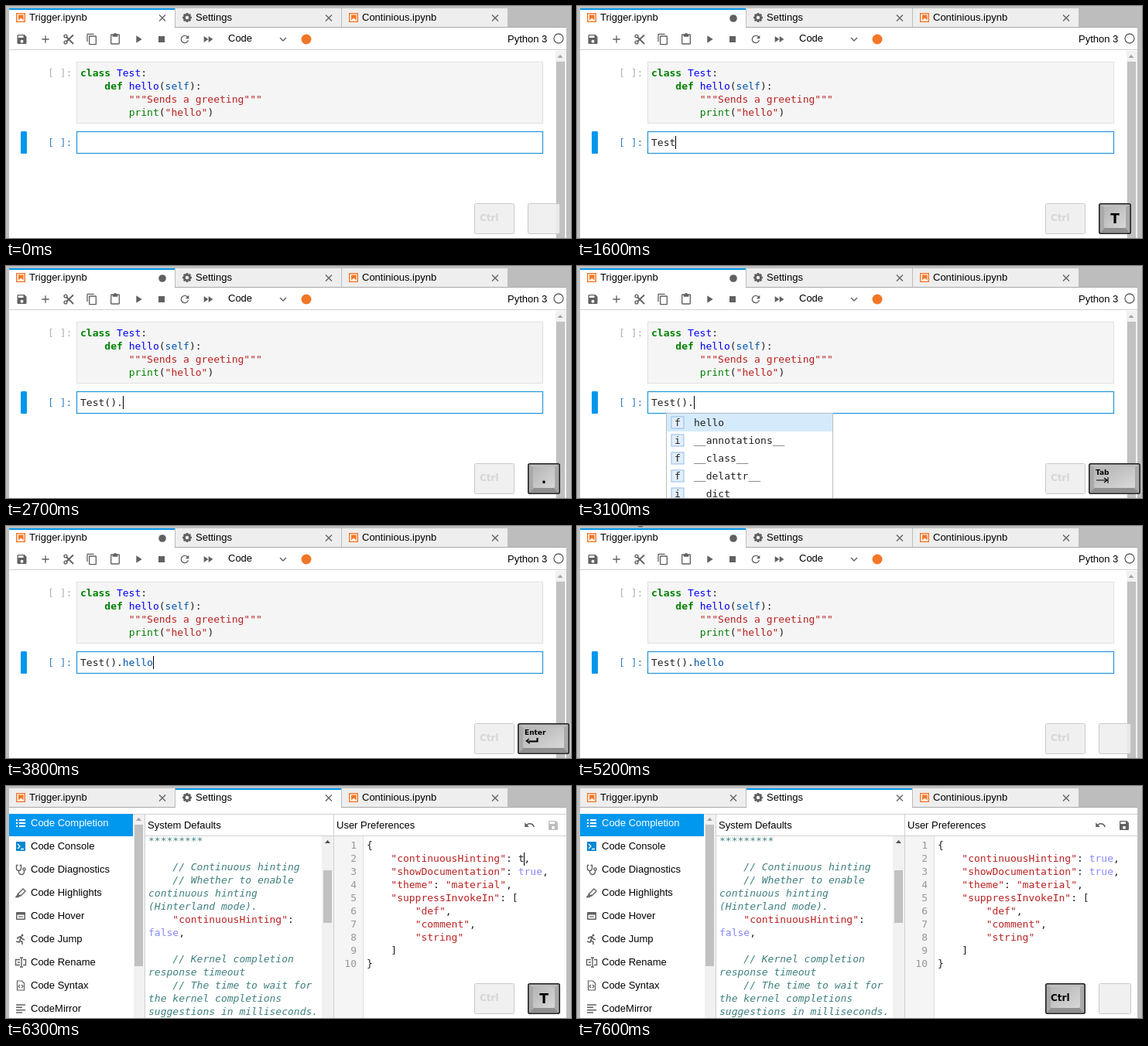
These frames come from a looping animation (730 px wide and 300 px high, 8000 ms). An HTML page:

```html
<!DOCTYPE html>
<html lang="en">
<head>
<meta charset="utf-8">
<title>Notebook completion</title>
<style>
html, body { margin: 0; width: 100%; height: 100%; overflow: hidden; background: #bdbdbd; }
svg { display: block; width: 730px; height: 300px; }
text { white-space: pre; fill: #000; }
.ui { font: 13px "Liberation Sans", Arial, sans-serif; }
.mono { font: 13px "DejaVu Sans Mono", monospace; fill: #212121; }
.kw { fill: #008000; font-weight: bold; }
.def { fill: #0000ff; }
.var { fill: #0055aa; }
.str { fill: #ba2121; }
.fn { fill: #008000; }
.com { fill: #408080; font-style: italic; }
.atom { fill: #8888ff; }
.num { fill: #999; text-anchor: end; }
.key { font: bold 17px "DejaVu Sans", sans-serif; }
.line { fill: none; stroke: #616161; stroke-width: 1.4; }
</style>
</head>
<body>
<svg id="stage" viewBox="0 0 730 300" xmlns="http://www.w3.org/2000/svg"></svg>
<script>
const LOOP = 8000;
const CHAR = 7.826;
const BLUE = '#0097ee', ORANGE = '#f37726', INK = '#616161', FADED = '#bdbdbd';

// Markup helpers
const rect = (x, y, w, h, fill, more = '') => `<rect x="${x}" y="${y}" width="${w}" height="${h}" fill="${fill}" ${more}/>`;
const path = (d, fill, more = '') => `<path d="${d}" fill="${fill}" ${more}/>`;
const stroke = (d, color = INK, width = 1.4) => `<path d="${d}" fill="none" stroke="${color}" stroke-width="${width}"/>`;
const ring = (x, y, r, color = INK, width = 1.4) => `<circle cx="${x}" cy="${y}" r="${r}" fill="none" stroke="${color}" stroke-width="${width}"/>`;
const dot = (x, y, r, fill, more = '') => `<circle cx="${x}" cy="${y}" r="${r}" fill="${fill}" ${more}/>`;
const at = (x, y, body, more = '') => `<g transform="translate(${x} ${y})" ${more}>${body}</g>`;
const group = (id, body) => `<g id="${id}">${body}</g>`;
const ui = (x, y, s, more = '') => `<text class="ui" x="${x}" y="${y}" ${more}>${s}</text>`;
const spans = parts => parts.map(p => typeof p === 'string' ? p : `<tspan class="${p[0]}">${p[1]}</tspan>`).join('');
const code = (x, y, ...parts) => `<text class="mono" x="${x}" y="${y}">${spans(parts)}</text>`;
const glyph = (cx, cy, d, more = '') =>
  `<path transform="translate(${cx - 8} ${cy - 8}) scale(.6667)" d="${d}" fill="${INK}" ${more}/>`;

const SAVE = 'M17 3H5c-1.1 0-2 .9-2 2v14c0 1.1.9 2 2 2h14c1.1 0 2-.9 2-2V7zM12 19a3 3 0 1 1 0-6a3 3 0 0 1 0 6zM15 9H5V5h10z';

// Tabs
const noteIcon = x => rect(x + .7, 9.7, 10.6, 10.6, '#fff', `stroke="${ORANGE}" stroke-width="1.4"`) +
  path(`M${x + 3} 11.5h6.5v7l-3.2 -3l-3.3 3z`, ORANGE);
const gear = (x, y) => ring(x, y, 3.6, INK, 2.8) + [0, 45, 90, 135].map(a =>
  `<path d="M-6 0h2.2M3.8 0h2.2" transform="translate(${x} ${y}) rotate(${a})" stroke="${INK}" stroke-width="2.6"/>`).join('');
const cross = x => stroke(`M${x - 4} 11.5l8 8m0 -8l-8 8`, INK, 1.3);

function tabs(active) {
  const names = ['Trigger.ipynb', 'Settings', 'Continious.ipynb'];
  return rect(4, 27, 720, 1, '#a9a9a9') + names.map((name, i) => {
    const x = 4 + 215 * i, on = i === active;
    return rect(x, 3, 214, on ? 26 : 24, on ? '#fff' : '#eee') +
      (on ? rect(x, 3, 214, 2, BLUE) : '') +
      (i === 1 ? gear(234, 15) : noteIcon(x + 9)) +
      ui(x + 26, 19, name);
  }).join('') + cross(417) + cross(632);
}

// Notebook page
function scissors(x, y) {
  return ring(x - 4, y - 4, 1.9) + ring(x - 4, y + 4, 1.9) +
    stroke(`M${x - 3} ${y - 3}L${x + 6} ${y + 6}M${x - 3} ${y + 3}L${x + 6} ${y - 5.5}`, INK, 1.8);
}

function toolbar() {
  return glyph(20.5, 43, SAVE) +
    glyph(51, 43, 'M19 13h-6v6h-2v-6H5v-2h6V5h2v6h6z') +
    scissors(81, 43) +
    glyph(111, 43, 'M16 1H4c-1.1 0-2 .9-2 2v14h2V3h12zM19 5H8c-1.1 0-2 .9-2 2v14c0 1.1.9 2 2 2h11c1.1 0 2-.9 2-2V7c0-1.1-.9-2-2-2zM19 21H8V7h11z', 'fill-rule="evenodd"') +
    glyph(141, 43, 'M19 2h-4.2a3 3 0 0 0-5.6 0H5c-1.1 0-2 .9-2 2v16c0 1.1.9 2 2 2h14c1.1 0 2-.9 2-2V4c0-1.1-.9-2-2-2zM19 20H5V4h2v3h10V4h2z', 'fill-rule="evenodd"') +
    glyph(171, 43, 'M8 5v14l11-7z') +
    glyph(201, 43, 'M6 6h12v12H6z') +
    glyph(231, 43, 'M17.65 6.35A8 8 0 1 0 19.73 14h-2.08A6 6 0 1 1 16.22 7.78L13 11h7V4z') +
    glyph(261, 43, 'M4 18l8.5-6L4 6zM13 6v12l8.5-6z') +
    ui(287, 46, 'Code') + stroke('M354 41l4 4l4 -4') +
    dot(388, 43, 6.5, ORANGE) +
    ui(648, 47, 'Python 3') + ring(714, 42, 6, INK, 1.3);
}

function completer() {
  const items = ['hello', '__annotations__', '__class__', '__delattr__', '__dict__'];
  const rows = items.map((name, i) => {
    const y = 191 + 23 * i;
    return (i ? '' : rect(116, y, 214, 23, '#d5ebfb')) +
      rect(122, y + 4, 16, 15, '#e3eefb', 'stroke="#90bdea"') +
      `<text class="mono" x="126" y="${y + 16}">${i === 1 || i === 4 ? 'i' : 'f'}</text>` + code(151, y + 16, name);
  }).join('');
  return rect(115.5, 190.5, 215, 120, '#fff', 'stroke="#bdbdbd"') + rows +
    group('docs', rect(330.5, 190.5, 160, 120, '#fff', 'stroke="#bdbdbd"') + ui(340, 208, 'Sends a greeting'));
}

function notebook() {
  return tabs(0) + group('clean', cross(202)) + group('dirty', dot(202, 16, 4.8, INK)) +
    rect(4, 28, 720, 28, '#fff') + rect(4, 56, 720, 244, '#fff') + rect(4, 56, 720, 1, '#d0d0d0') + toolbar() +
    rect(710, 58, 14, 242, '#f1f1f1') + path('M712.5 67l3.5 -4l3.5 4z', '#a3a3a3') + rect(711, 72, 11, 228, '#c1c1c1') +
    '<text class="mono" x="54" y="91" style="fill:#b0b0b0">[ ]:</text>' +
    rect(91.5, 72.5, 602, 79, '#f5f5f5', 'stroke="#e0e0e0"') +
    code(96, 91, ['kw', 'class'], ' ', ['def', 'Test'], ':') +
    code(96, 108, '    ', ['kw', 'def'], ' ', ['def', 'hello'], '(', ['var', 'self'], '):') +
    code(96, 125, '        ', ['str', '"""Sends a greeting"""']) +
    code(96, 142, '        ', ['fn', 'print'], '(', ['str', '"hello"'], ')') +
    rect(19, 162, 8, 29, BLUE, 'rx="1.5"') +
    '<text class="mono" x="54" y="181" style="fill:#307fc1">[ ]:</text>' +
    rect(91.5, 162.5, 602, 28, '#fff', 'stroke="#1f97da" stroke-width="1.2"') +
    '<text class="mono" id="cell" x="96" y="181"></text>' + rect(96, 168, 1, 17, '#000', 'id="caret"') +
    group('popup', completer()) + group('pointer', path('M78 0h8l-2 1.6h-4z', '#666'));
}

// Settings page; every side icon is drawn around its own centre
const sideIcons = [
  stroke('M-6 -4h2M-2 -4h8M-6 0h2M-2 0h8M-6 4h2M-2 4h8', '#fff', 1.8),
  rect(-6, -6, 12, 12, '#0288d1') + stroke('M-4 -3l3 3l-3 3M0 3.5h4', '#fff', 1.3),
  stroke('M-3.5 -5.5h-2v4a3 3 0 0 0 6 0v-4h-2M-2.5 2v1a3.5 3.5 0 0 0 7 0v-2') + ring(4.5, -.5, 1.6),
  stroke('M-3 1l6 -6l3 3l-6 6h-3zM-3 1l-1 1l2 2l2 -1M-4 3l-2 2.5h3l1 -1'),
  rect(-6, -5, 12, 10, INK, 'rx="1"') + rect(-4.5, -1.5, 9, 5, '#fff') + stroke('M-3 1h6', INK, 1.2),
  dot(2, -5, 1.5, INK) + stroke('M-4 0v-2l4 -1.2l2 3l3 1M0 -3l-1 5l3 1.5v3.5M-1 1l-1 3l-4 -1', INK, 1.6),
  stroke('M-1 -3.5h-5.5v7h5.5M3 -3.5h3.5v7h-3.5M1 -6v12M-1 -6h4M-1 6h4M-4 0h3'),
  stroke('M-4.5 -6h6l3 3v9h-9zM-1 -1l-2 2l2 2M1 -1l2 2l-2 2', INK, 1.2),
  stroke('M-6 -5h12M-6 -1.7h8M-6 1.7h12M-6 5h8', INK, 1.5)
];

function sidebar() {
  const names = ['Completion', 'Console', 'Diagnostics', 'Highlights', 'Hover', 'Jump', 'Rename', 'Syntax'].map(s => 'Code ' + s);
  return rect(4, 36, 160, 29, BLUE) + [...names, 'CodeMirror'].map((name, i) =>
    at(19, 48 + 30 * i, sideIcons[i]) + ui(32, 52 + 30 * i, name, i ? '' : 'style="fill:#fff"')).join('') +
    rect(165, 37, 14, 263, '#f1f1f1') + path('M168 45l3.5 -4l3.5 4z', '#a3a3a3') + rect(166, 50, 11, 183, '#c1c1c1');
}

function defaults() {
  const com = s => [['com', s]];
  const lines = [com('*********'), [], com('    // Continuous hinting'), com('    // Whether to enable'),
    com('continuous hinting'), com('(Hinterland mode).'), ['    ', ['str', '"continuousHinting"'], ':'],
    [['atom', 'false'], ','], [], com('    // Kernel completion'), com('response timeout'),
    com('    // The time to wait for'), com('the kernel completions'), com('suggestions in milliseconds.')];
  return ui(183, 55, 'System Defaults') + lines.map((l, i) => code(184, 75 + 17 * i, ...l)).join('') +
    rect(408, 65, 15, 235, '#f1f1f1') + path('M412 74l3.5 -4l3.5 4z', '#505050') + rect(410, 109, 11, 68, '#c1c1c1');
}

function preferences() {
  const pair = (key, ...rest) => ['    ', ['str', `"${key}"`], ': ', ...rest];
  const item = (s, end = ',') => ['        ', ['str', `"${s}"`], end];
  const lines = [['{'], [], pair('showDocumentation', ['atom', 'true'], ','),
    pair('theme', ['str', '"material"'], ','), pair('suppressInvokeIn', '['),
    item('def'), item('comment'), item('string', ''), ['    ]'], ['}']];
  return rect(423, 36, 1, 264, '#d0d0d0') + ui(427, 55, 'User Preferences') +
    `<path id="undo" transform="translate(669 43) scale(.62)" d="M12.5 8c-2.65 0-5.05 1-6.9 2.6L2 7v9h9l-3.6-3.6a8 8 0 0 1 12.7 4l2.4-.8A10.5 10.5 0 0 0 12.500 8z"/>` +
    glyph(707, 51, SAVE, 'id="save"') +
    rect(424, 65, 37, 235, '#f5f5f5') + rect(461, 65, 1, 235, '#ddd') +
    rect(661.6, 86, 5 * CHAR, 17, '#d7d4f0', 'id="selection"') +
    lines.map((l, i) => `<text class="mono num" x="453" y="${81 + 17 * i}" style="fill:#999">${i + 1}</text>` + code(466, 81 + 17 * i, ...l)).join('') +
    '<text class="mono" id="hint" x="466" y="98"></text>' + rect(670, 86, 1, 17, '#000', 'id="caret2"');
}

function settings() {
  return tabs(1) + cross(202) + rect(4, 28, 720, 272, '#fff') + rect(4, 36, 720, 1, '#d0d0d0') +
    sidebar() + rect(179, 36, 1, 264, '#d0d0d0') + defaults() + preferences() +
    rect(180, 64, 544, 1, '#d0d0d0');
}

// On-screen keys
const keyOff = (x, w) => rect(x + .5, 255.5, w - 1, 39, '#eee', 'rx="2" stroke="#c9c9c9" fill-opacity=".88"');
const keyOn = (x, w) => rect(x + .8, 255.8, w - 1.6, 38.4, '#a9a9a9', 'rx="2" stroke="#222" stroke-width="1.6"') +
  path(`M${x + 2} 257h${w - 4}l-6 4h${16 - w}z`, '#bebebe') +
  path(`M${x + 2} 293h${w - 4}l-6 -6h${16 - w}z`, '#8f8f8f') +
  rect(x + 7, 260, w - 14, 27, 'url(#face)', 'rx="2"');
const label = (x, y, s, size, fill, more = '') =>
  `<text class="key" x="${x}" y="${y}" style="font-size:${size}px;fill:${fill}" ${more}>${s}</text>`;

function lastKey(name) {
  if (!name) return keyOff(674, 42);
  if (name.length === 1) return keyOn(674, 42) + label(695, 281, name, 17, '#000', 'text-anchor="middle"');
  const mark = name === 'Enter'
    ? 'M686 274v4h-13M676 275l-4 3l4 3v-2h11v-5'
    : 'M671 277h14m-4 -3l4 3l-4 3M686 273v8';
  return keyOn(661, 67) + label(670, 270, name, 9, '#000') + stroke(mark, '#000', 1.1);
}
const ctrlKey = on => (on ? keyOn : keyOff)(605, 52) + label(612, 278, 'Ctrl', 12, on ? '#000' : '#d6d6d6');

// Timelines: [start time, value], held until the next entry
const step = (list, t) => list.reduce((v, [start, next]) => t >= start ? next : v, list[0][1]);
const TYPED = [[0, ''], [900, 'T'], [1200, 'Te'], [1400, 'Tes'], [1600, 'Test'], [2100, 'Test('], [2300, 'Test()'],
  [2600, 'Test().'], [3800, 'Test().hello']];
const CARET = [[0, 0], [100, 1], [600, 0], [900, 1], [3200, 0], [3800, 1], [4200, 0], [4700, 1], [4900, 0]];
const KEYS = [[0, ''], [900, 'T'], [1200, 'E'], [1400, 'S'], [1600, 'T'], [2000, ''], [2100, '('], [2300, ')'],
  [2600, '.'], [3000, 'Tab'], [3200, ''], [3800, 'Enter'], [4000, ''],
  [6300, 'T'], [6500, 'R'], [6600, 'U'], [6900, 'E'], [7400, '']];
const VALUE = [[0, 'false'], [6300, 't'], [6500, 'tr'], [6600, 'tru'], [6900, 'true']];

const stage = document.getElementById('stage');
stage.innerHTML = '<defs><linearGradient id="face" x1="0" y1="0" x2="1" y2="1">' +
  '<stop offset="0" stop-color="#b4b4b4"/><stop offset="1" stop-color="#d8d8d8"/></linearGradient></defs>' +
  rect(0, 0, 730, 300, '#bdbdbd') + group('notebook', notebook()) + group('settings', settings()) +
  group('ctrl', '') + group('last', '');
const $ = id => document.getElementById(id);
const show = (id, on) => $(id).setAttribute('visibility', on ? 'inherit' : 'hidden');
const put = (id, html) => {
  const el = $(id);
  if (el.shown !== html) el.innerHTML = el.shown = html;
};

function draw(t) {
  const inSettings = t >= 5300;
  show('notebook', !inSettings);
  show('settings', inSettings);

  const typed = step(TYPED, t);
  put('cell', typed.replace('hello', spans([['var', 'hello']])));
  $('caret').setAttribute('x', Math.round(96 + typed.length * CHAR));
  show('caret', step(CARET, t));
  show('dirty', typed);
  show('clean', !typed);
  show('popup', t >= 3100 && t < 3800);
  show('docs', t >= 3200 && t < 3800);
  show('pointer', t >= 4900 && !inSettings);

  const value = step(VALUE, t), edited = t >= 6300;
  const valid = !edited || t >= 7000;
  put('hint', spans(['    ', ['str', '"continuousHinting"'], ': ', valid ? ['atom', value] : value, ',']));
  show('selection', !edited);
  $('caret2').setAttribute('x', Math.round(466 + (25 + value.length) * CHAR));
  show('caret2', edited && t < 7600);
  $('undo').setAttribute('fill', edited ? INK : FADED);
  $('save').setAttribute('fill', t >= 7100 ? INK : FADED);

  put('ctrl', ctrlKey(t >= 7600));
  put('last', lastKey(step(KEYS, t)));
}

const begin = performance.now();
function tick() {
  draw((performance.now() - begin) % LOOP);
  requestAnimationFrame(tick);
}
tick();
</script>
</body>
</html>
```
